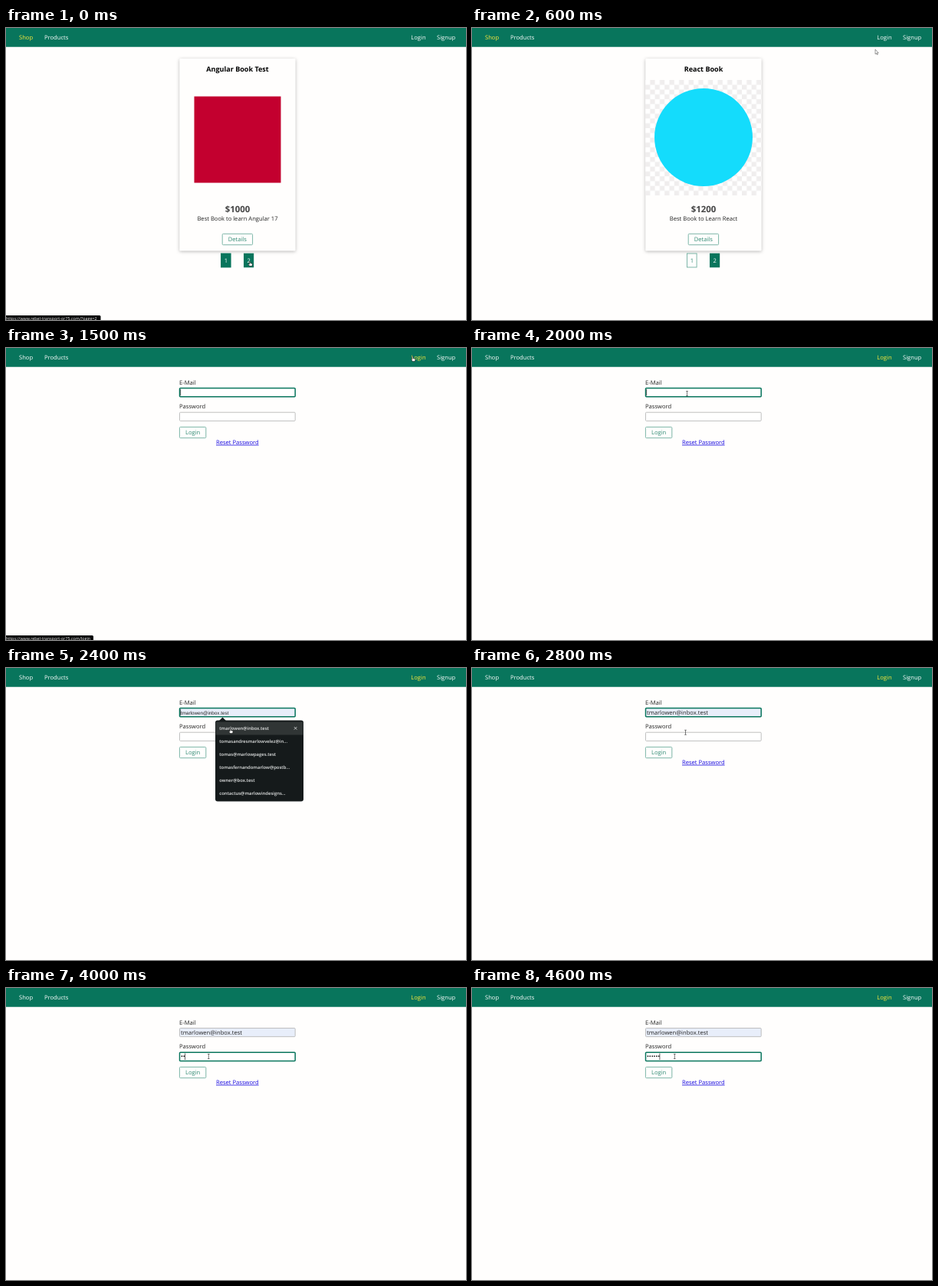
An HTML page that plays this animation: 600 by 382 pixels, repeating every 5 s.

```html
<!DOCTYPE html>
<html lang="en">
<head>
<meta charset="utf-8">
<title>Book shop login</title>
<style>
  html, body { margin: 0; width: 100%; height: 100%; overflow: hidden; background: #fffefd; }
  svg { display: block; width: 600px; height: 382px; font: 7.6px "Open Sans", sans-serif; fill: #222; text-rendering: geometricPrecision; }
  .mid { text-anchor: middle; }
  .nav { fill: #fff; font-weight: 500; }
  .on { fill: #ffeb3b; }
  .bold { font-weight: 700; }
  .teal { fill: #08755c; }
  .soft { fill: #2f8a74; }
  .line { fill: none; stroke: #6fae9f; stroke-width: .9; }
  .card { fill: #fffefd; filter: drop-shadow(0 1px 2px rgba(0, 0, 0, .28)); }
  .field { fill: #fff; stroke: #b8b8b8; stroke-width: .9; }
  .field.filled { fill: #e8eefa; }
  .field.focus { stroke: #08755c; stroke-width: 1.5; }
  .menu { font-size: 5.9px; font-weight: 600; fill: #e4e6e6; }
  .preview { font: 6.3px "Liberation Sans", Arial, sans-serif; }
</style>
</head>
<body>
<svg viewBox="0 0 600 382">
  <defs>
    <pattern id="checks" x="226" y="68" width="12.6" height="12.6" patternUnits="userSpaceOnUse">
      <path fill="#fff" d="M0 0h12.6v12.6H0z"/>
      <path fill="#f0eeee" d="M6.3 0h6.3v6.3H6.3zM0 6.3h6.3v6.3H0z"/>
    </pattern>
  </defs>
  <path class="teal" d="M0 0h600v24.7H0z"/>
  <text id="shop" class="nav" x="17" y="14.6">Shop</text>
  <text class="nav" x="50" y="14.6">Products</text>
  <text id="login" class="nav" x="528.3" y="14.6">Login</text>
  <text class="nav" x="562" y="14.6">Signup</text>

  <g id="store" class="mid">
    <rect class="card" x="226.3" y="40" width="151.3" height="251.6" rx="1"/>
    <g id="book1">
      <rect x="245.5" y="89.5" width="113" height="113" fill="#c3002f"/>
    </g>
    <g id="book2">
      <path fill="url(#checks)" d="M226.3 68h151.3v151H226.3z"/>
      <circle cx="302" cy="143" r="64" fill="#14dcfc"/>
    </g>
    <text id="title" class="bold" x="302" y="57.3" font-size="9.05" fill="#000"></text>
    <text id="price" class="bold" x="302" y="240.8" font-size="11.4" fill="#464646"></text>
    <text id="blurb" x="302" y="251.6"></text>
    <rect class="line" x="282.2" y="269.3" width="39.4" height="14.4" rx="1.2"/>
    <text class="soft" x="301.8" y="279.2">Details</text>
    <rect id="page1" class="line" x="280.5" y="295" width="12.6" height="18"/>
    <text id="num1" x="286.8" y="306.8">1</text>
    <path class="teal" d="M310 294.7h13.2v18.6H310z"/>
    <text x="316.6" y="306.8" fill="#fff">2</text>
  </g>

  <g id="form">
    <text x="226" y="47.7">E-Mail</text>
    <rect id="mail" class="field" x="226.5" y="52.5" width="150.7" height="11.2" rx="1"/>
    <text id="address" x="228" y="60.8">tmarlowen@inbox.test</text>
    <text x="226" y="79.4">Password</text>
    <rect id="pass" class="field" x="226.5" y="84.2" width="150.7" height="11.2" rx="1"/>
    <text id="dots" x="228" y="92.2" fill="#000"></text>
    <path id="caret" d="M0 0h.7v8.4H0z"/>
    <rect class="line" x="226.4" y="103.4" width="34.4" height="14.3" rx="1.2"/>
    <text class="soft mid" x="243.6" y="113.3">Login</text>
    <text x="274" y="125.7" fill="#1a0be0" text-decoration="underline">Reset Password</text>
    <g id="menu" class="menu">
      <path fill="#151a1b" d="M278 69l4.5-4.6 4.5 4.6z"/>
      <rect x="273" y="68.5" width="115" height="106" rx="3" fill="#151a1b"/>
      <path id="row" fill="#303535" d="M273.5 70.5h114v17h-114z"/>
      <path d="M375.8 77l3.6 3.6m0-3.6l-3.6 3.6" stroke="#e4e6e6" stroke-width=".8"/>
    </g>
  </g>

  <g id="status">
    <rect id="bar" y="376" height="8" rx="1.5" x="-2" fill="#050505"/>
    <text id="link" y="382.4" font-size="5.4" fill="#f2f2f2"></text>
  </g>

  <g id="cursor">
    <path id="arrow" d="M0 0v6.2l1.4-1.2 1 2 .9-.4-.9-2h1.8z" fill="#fff" stroke="#555" stroke-width=".6"/>
    <path id="hand" d="M-.6 .5Q0-.4 .6 .5V2.6L3 3.2Q3.6 3.5 3.4 4.3L2.8 6.6H-.2L-2 4.2Q-1.8 3.4-.6 4.1z" fill="#fff" stroke="#111" stroke-width=".6"/>
    <path id="beam" d="M-1.3-3h2.6M0-3v6M-1.3 3h2.6" fill="none" stroke="#444" stroke-width=".7"/>
  </g>
</svg>
<script>
const LOOP = 5000, SITE = 'https://www.rebel-transport-or75.com/';
const $ = id => document.getElementById(id);
const show = (id, yes) => $(id).style.display = yes ? '' : 'none';
const flag = (id, name, yes) => $(id).classList.toggle(name, yes);

const mails = ['tmarlowen@inbox.test', 'tomasandresmarlowvelez@in...', 'tomas@marlowpages.test',
  'tomasfernandomarlow@postb...', 'owner@box.test', 'contactus@marlowindesigns...'];
mails.forEach((mail, i) => {
  const text = document.createElementNS('http://www.w3.org/2000/svg', 'text');
  text.setAttribute('x', 278.3);
  text.setAttribute('y', 81 + 17 * i);
  text.textContent = mail;
  $('menu').append(text);
});

// pointer stops: time, x, y
const stops = [[0, 318, 305], [200, 318, 305], [600, 526, 28], [1000, 530.5, 11], [1800, 530.5, 11],
  [2000, 280.5, 59.5], [2100, 280.5, 59.5], [2400, 292.7, 79], [2600, 292.7, 79], [3000, 264.3, 89.5], [LOOP, 264.3, 89.5]];
// pointer shapes: until, shape
const shapes = [[300, 'hand'], [900, 'arrow'], [1900, 'hand'], [2000, 'arrow'],
  [2200, 'beam'], [2700, 'hand'], [LOOP, 'beam']];

function pointer(t) {
  const i = stops.findIndex(s => s[0] > t);
  const [t0, x0, y0] = stops[i - 1], [t1, x1, y1] = stops[i];
  const k = (t - t0) / (t1 - t0), e = k * k * (3 - 2 * k);
  $('cursor').setAttribute('transform', `translate(${x0 + (x1 - x0) * e} ${y0 + (y1 - y0) * e})`);
  const shape = shapes.find(s => t < s[0])[1];
  for (const id of ['arrow', 'hand', 'beam']) show(id, id === shape);
}

function store(t) {
  const first = t < 300;
  show('book1', first);
  show('book2', !first);
  $('title').textContent = first ? 'Angular Book Test' : 'React Book';
  $('price').textContent = first ? '$1000' : '$1200';
  $('blurb').textContent = first ? 'Best Book to learn Angular 17' : 'Best Book to Learn React';
  $('page1').style.fill = first ? '#08755c' : 'none';
  $('page1').style.stroke = first ? '#08755c' : '';
  $('num1').style.fill = first ? '#fff' : '#2f8a74';
}

function form(t) {
  const open = t >= 2200 && t < 2600, onPass = t >= 3100;
  const typed = [4000, 4000, 4100, 4500, 4500, 4600].filter(s => t >= s).length;
  show('menu', open);
  show('row', t >= 2300);
  show('address', t >= 2300);
  flag('address', 'preview', t < 2600);
  flag('mail', 'filled', t >= 2300);
  flag('mail', 'focus', !onPass);
  flag('pass', 'focus', onPass);
  $('dots').textContent = '•'.repeat(typed);
  show('caret', t < 2600 || onPass && (t < 3700 || t >= 4000));
  $('caret').setAttribute('transform', `translate(${227.4 + typed * 2.86} ${onPass ? 85.6 : 53.9})`);
}

function draw(now) {
  const t = Math.floor(now % LOOP / 100) * 100;
  const inStore = t < 1200;
  show('store', inStore);
  show('form', !inStore);
  flag('shop', 'on', inStore);
  flag('login', 'on', t >= 900);
  show('status', t < 300 || t >= 900 && t < 1900);
  $('link').textContent = SITE + (t < 300 ? '?page=2' : 'login');
  $('bar').setAttribute('width', t < 300 ? 125.5 : 116);
  store(t);
  form(t);
  pointer(t);
}

const start = performance.now();
function tick() {
  draw(performance.now() - start);
  requestAnimationFrame(tick);
}
tick();
</script>
</body>
</html>
```
